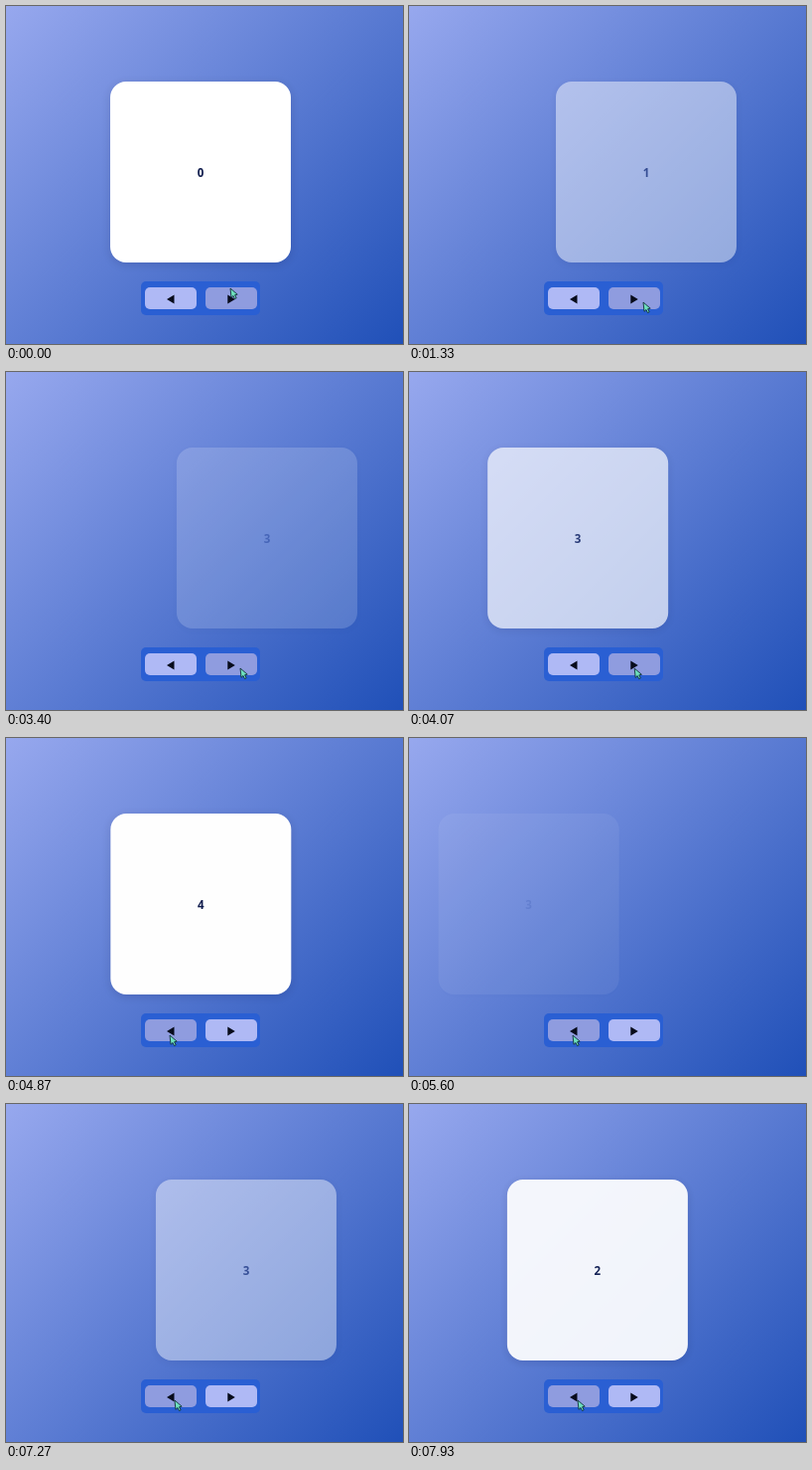
An HTML page for the animation above (8000 ms loop, 400x340 px).

```html
<!DOCTYPE html>
<html lang="en">
<head>
<meta charset="utf-8">
<title>Card slider</title>
<style>
html, body { margin: 0; width: 100%; height: 100%; overflow: hidden; }
body { background: #5b7cd3; }
#stage {
  position: relative; width: 400px; height: 340px; overflow: hidden;
  background: linear-gradient(135deg, #97a8ee, #2050b8);
}
#stage > * { position: absolute; }
#card {
  left: 105px; top: 76px; width: 182px; height: 182px; border-radius: 16px;
  background: #fff; box-shadow: 0 2px 8px rgba(0, 0, 50, .15);
  color: #0f1b4c; font: 700 11.5px/183px "Noto Sans", sans-serif; text-align: center;
}
#nav { left: 136px; top: 277px; width: 120px; height: 34px; border-radius: 5px; background: #2a5fd3; }
.button { top: 283px; width: 51.5px; height: 22px; border-radius: 5px; background: #afb9f5; }
.button.hover { background: #8f9cdf; }
#prev { left: 140px; }
#next { left: 201px; }
svg { left: 0; top: 0; }
</style>
</head>
<body>
<div id="stage">
  <div id="card"></div>
  <div id="nav"></div>
  <div id="prev" class="button"></div>
  <div id="next" class="button"></div>
  <svg width="400" height="340">
    <path d="M162 295l7.5-4.6v9.2zM230.8 295l-7.5-4.6v9.2z" fill="#080c1c"/>
    <path id="cursor" d="M0 0L7.2 6.2L4.6 6.7L6.2 9.8L4.5 10.6L3 7.5L1 9.3Z"
      fill="#6ee0bd" stroke="#12323c" stroke-width=".9" stroke-linejoin="round"/>
  </svg>
</div>
<script>
const LOOP = 8000, SHIFT = 80, ENTER = 600, EXIT = 540;

// label, enter time, enter side, exit time, exit side
const cards = [
  ["0", -1000, 1, 590, 1],
  ["1", 1143, 1, 1740, -1],
  ["2", 2310, 1, 2750, -1],
  ["3", 3340, 1, 3760, -1],
  ["4", 4300, 1, 5010, -1],
  ["3", 5580, -1, 6885, 1],
  ["2", 7465, -1, 9000, 1]
];

// time, x, y of the pointer tip
const pointer = [
  [0, 226, 284], [70, 226, 284], [330, 236, 298],
  [3950, 236, 298], [4500, 165, 299],
  [6890, 165, 299], [7300, 170, 298], [LOOP, 170, 298]
];

const $ = id => document.getElementById(id);
const clamp = v => Math.min(1, Math.max(0, v));
const mix = (a, b, p) => a + (b - a) * p;

// cubic-bezier(0, 0, .58, 1)
function easeOut(p) {
  let lo = 0, hi = 1;
  for (let i = 0; i < 24; i++) {
    const u = (lo + hi) / 2;
    if (1.74 * u * u * (1 - u) + u ** 3 < p) lo = u; else hi = u;
  }
  return lo * lo * (3 - 2 * lo);
}
const easeIn = p => 1 - easeOut(1 - p);

function cardOffset([, enter, enterSide, exit, exitSide], t) {
  const entering = time => enterSide * SHIFT * (1 - easeOut(clamp((time - enter) / ENTER)));
  return t < exit ? entering(t)
    : mix(entering(exit), exitSide * SHIFT, easeIn(clamp((t - exit) / EXIT)));
}

function drawCard(t) {
  const card = cards.find(c => t >= c[1] && t < c[3] + EXIT);
  const style = $("card").style;
  style.visibility = card ? "visible" : "hidden";
  if (!card) return;
  const x = cardOffset(card, t);
  $("card").textContent = card[0];
  style.transform = `translateX(${x}px)`;
  style.opacity = clamp(1 - Math.abs(x) / SHIFT);
}

function drawPointer(t) {
  const i = pointer.findIndex(k => k[0] > t);
  const [t0, x0, y0] = pointer[i - 1], [t1, x1, y1] = pointer[i];
  const p = (t - t0) / (t1 - t0), s = p * p * (3 - 2 * p);
  const x = mix(x0, x1, s), y = mix(y0, y1, s);
  $("cursor").setAttribute("transform", `translate(${x} ${y})`);
  $("prev").classList.toggle("hover", x >= 140 && x <= 191.5);
  $("next").classList.toggle("hover", x >= 201 && x <= 252.5);
}

const start = performance.now();
function frame() {
  const t = (performance.now() - start) % LOOP;
  drawCard(t);
  drawPointer(t);
  requestAnimationFrame(frame);
}
frame();
</script>
</body>
</html>
```
